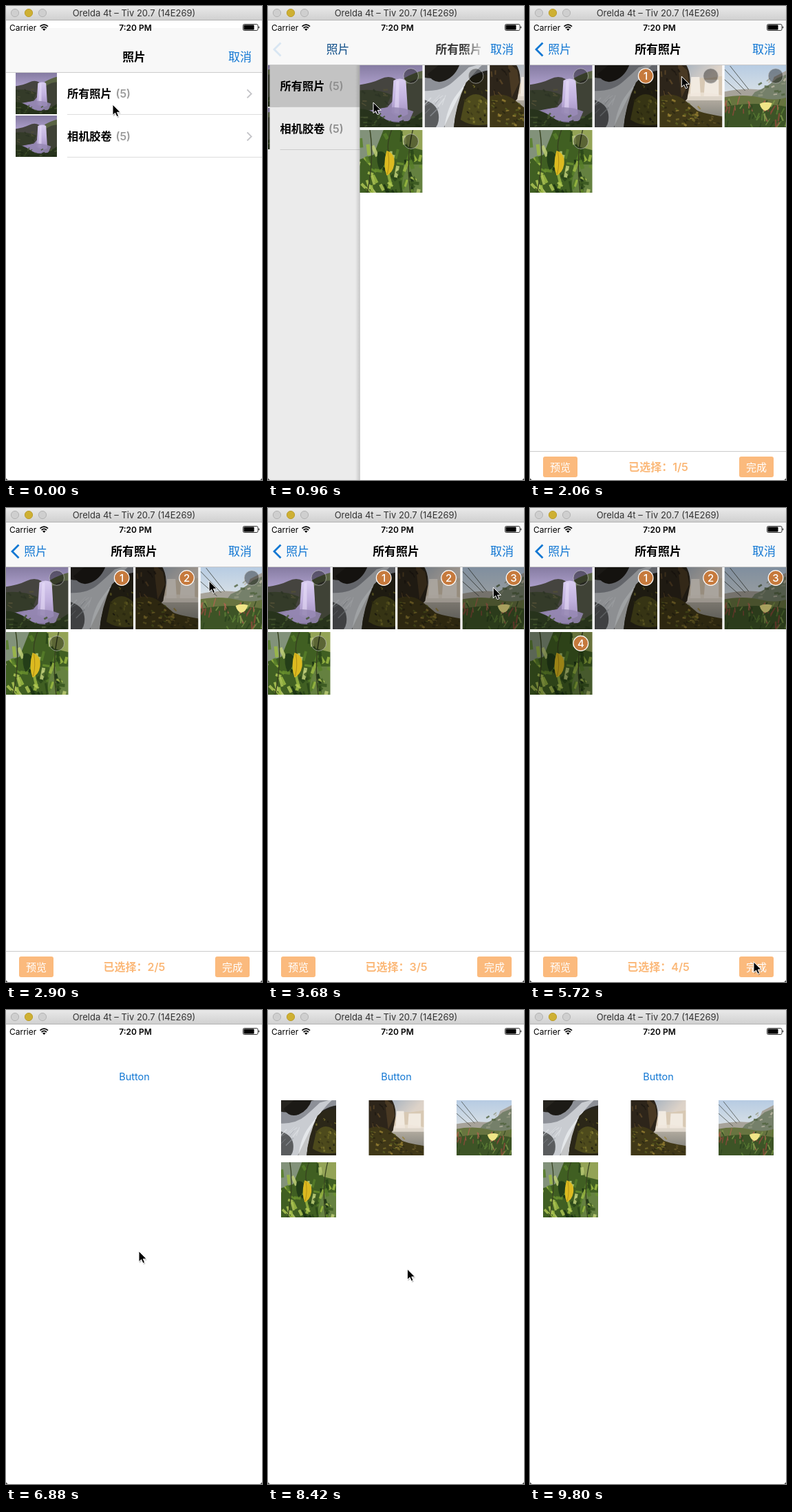
These frames come from a looping animation (372 px wide and 688 px high, 9.82 s). An HTML page:

```html
<!DOCTYPE html>
<html lang="zh-CN">
<head>
<meta charset="utf-8">
<title>Photo picker</title>
<style>
html, body { margin: 0; width: 100%; height: 100%; overflow: hidden; background: #fff; }
svg { display: block; width: 372px; height: 688px; font-family: Inter, "Noto Sans CJK SC", "Noto Sans CJK", sans-serif; }
.mid { text-anchor: middle; }
.bold { font-weight: 600; }
.cjk { font-family: "Noto Sans CJK SC", "Noto Sans CJK", "Noto Sans", sans-serif; }
.blue { fill: #1277d3; }
</style>
</head>
<body>
<svg viewBox="0 0 372 688" xmlns="http://www.w3.org/2000/svg">
  <defs>
    <linearGradient id="chrome" x2="0" y2="1"><stop stop-color="#e9e9e9"/><stop offset="1" stop-color="#d0d0d0"/></linearGradient>
    <linearGradient id="edge"><stop stop-opacity="0"/><stop offset="1" stop-opacity=".16"/></linearGradient>
    <linearGradient id="fade" gradientUnits="userSpaceOnUse" x1="284" x2="316"><stop/><stop offset="1" stop-opacity="0"/></linearGradient>
    <linearGradient id="sky1" x2="0" y2="1"><stop stop-color="#7f769b"/><stop offset=".35" stop-color="#ad9fcb"/><stop offset="1" stop-color="#75688f"/></linearGradient>
    <linearGradient id="fall1" x2="0" y2="1"><stop stop-color="#d9cdf0"/><stop offset=".5" stop-color="#c2b2df"/><stop offset="1" stop-color="#a18fbe"/></linearGradient>
    <linearGradient id="sky3" x2="1" y2="1"><stop stop-color="#7c99b8"/><stop offset=".5" stop-color="#dcd2c8"/><stop offset="1" stop-color="#efe0cc"/></linearGradient>
    <linearGradient id="lake3" x2="0" y2="1"><stop stop-color="#b9b1a5"/><stop offset="1" stop-color="#6c6f6a"/></linearGradient>
    <linearGradient id="sky4" x2="0" y2="1"><stop stop-color="#b3c9e2"/><stop offset=".5" stop-color="#dbe2e6"/></linearGradient>
    <filter id="soft" x="0" y="0" width="1" height="1"><feGaussianBlur stdDeviation=".75"/></filter>
    <clipPath id="screen"><rect y="21" width="372" height="667"/></clipPath>
    <clipPath id="body"><rect y="85" width="372" height="603"/></clipPath>
  </defs>
  <rect width="372" height="688" fill="#fff"/>
  <g clip-path="url(#screen)">
    <text class="mid blue" x="186.5" y="102" font-size="14.4">Button</text>
    <g id="results"></g>
    <g id="modal">
      <rect y="21" width="372" height="667" fill="#fff"/>
      <g clip-path="url(#body)">
        <g id="list"></g>
        <rect id="dim" y="85" width="372" height="603"/>
        <g id="page">
          <rect x="-7" y="85" width="7" height="603" fill="url(#edge)"/>
          <rect y="85" width="372" height="603" fill="#fff"/>
          <g id="grid"></g>
          <g id="bar">
            <rect y="643" width="372" height="46" fill="#fff"/>
            <path d="M0 643.5H372" stroke="#cbcbcb"/>
            <g fill="#fbba7d"><rect x="19" y="651" width="50" height="30" rx="3"/><rect x="304" y="651" width="50" height="30" rx="3"/></g>
            <g class="mid cjk" font-size="15" fill="#fff"><text x="44" y="671.5">预览</text><text x="329" y="671.5">完成</text></g>
            <text id="count" class="mid bold" x="186.5" y="671.5" font-size="16" fill="#fbb878"></text>
          </g>
        </g>
      </g>
      <rect y="21" width="372" height="64" fill="#f8f8f8"/>
      <path d="M0 85.5H372" stroke="#c9c9c9"/>
      <path id="back" d="M18.5 53.5L9 63L18.5 72.5" fill="none" stroke="#1277d3" stroke-width="2.8"/>
      <text id="album" class="mid cjk" y="69.3" font-size="16.8">照片</text>
      <text id="title" class="mid cjk" y="69.3" font-size="16.9" font-weight="600" fill="url(#fade)">所有照片</text>
      <text class="cjk blue" x="323" y="69.3" font-size="17">取消</text>
    </g>
    <text x="5" y="35.5" font-size="12">Carrier</text>
    <g fill="none" stroke="#000" stroke-width="1.7"><path d="M49.5 29.6Q55.3 24.6 61 29.6M51.6 32Q55.3 28.8 59 32"/></g>
    <path d="M55.3 36L53 33.6Q55.3 31.8 57.6 33.6Z"/>
    <text class="mid bold" x="188" y="35.5" font-size="12">7:20 PM</text>
    <rect x="344.5" y="26.5" width="21.5" height="9" rx="1.8" fill="none" stroke="#222" stroke-width=".9"/>
    <rect x="345.5" y="27.5" width="15" height="7" rx=".8"/>
    <path d="M367 29.3Q369.4 31 367 32.7Z"/>
  </g>
  <rect width="372" height="20.5" fill="url(#chrome)"/>
  <path d="M0 20.5H372" stroke="#b4b4b4"/>
  <g fill="#cfcfcf" stroke="#b3b3b3"><circle cx="13" cy="10" r="5.6"/><circle cx="33" cy="10" r="5.6" fill="#ceb033" stroke="#bb9d2b"/><circle cx="53" cy="10" r="5.6"/></g>
  <text class="mid" x="186" y="15" font-size="13" fill="#333">Orelda 4t – Tiv 20.7 (14E269)</text>
  <path d="M0 685V688H3Q.6 687.4 0 685ZM372 685V688H369Q371.4 687.4 372 685Z" fill="#333"/>
  <g id="cursor">
    <path d="M1 2V17.5L4.5 14.2L7 19.5L9.6 18.4L7.3 13.2H12Z" fill="#000" opacity=".22"/>
    <path d="M0 0V15.5L3.6 12.2L6 17.6L8.6 16.5L6.3 11.3H11.2Z" stroke="#fff" stroke-width="1"/>
  </g>
</svg>
<script>
const LOOP = 9820;
const $ = id => document.getElementById(id);
const set = (el, attrs) => { for (const k in attrs) el.setAttribute(k, attrs[k]); };
const clamp = u => Math.max(0, Math.min(1, u));
const smooth = u => (u = clamp(u), u * u * (3 - 2 * u));
const move = (el, x, y) => el.setAttribute('transform', `translate(${x} ${y})`);
// Share of the way still to go, for a critically damped system slide.
const left = ms => { const x = Math.max(0, ms) * .018; return (1 + x) * Math.exp(-x); };

let seed = 7;
const rnd = (a, b) => { seed = (seed * 16807) % 2147483647; return a + (b - a) * seed / 2147483647; };
const shape = (d, fill, op = 1) => `<path d="${d}" fill="${fill}" opacity="${op}"/>`;
const line = (d, color, w, op = 1) => `<path d="${d}" fill="none" stroke="${color}" stroke-width="${w}" opacity="${op}"/>`;
const back = fill => `<rect x="-4" y="-4" width="99" height="99" fill="${fill}"/>`;

// Scattered leaf-like strokes inside a box.
function flecks(n, [x, y, w, h], colors, len, lean, width, op = .8) {
  let out = '';
  for (let i = 0; i < n; i++) {
    const a = lean + rnd(-.6, .6), l = rnd(.5, 1) * len;
    const px = rnd(x, x + w), py = rnd(y, y + h);
    const d = `M${px.toFixed(1)} ${py.toFixed(1)}l${(l * Math.cos(a)).toFixed(1)} ${(l * Math.sin(a)).toFixed(1)}`;
    out += line(d, colors[i % colors.length], (width * rnd(.6, 1.2)).toFixed(1), op);
  }
  return out;
}

const photos = [
  back('url(#sky1)') +
  shape('M-4 30Q18 27 30 21T52 21L54 46L40 62L-4 68Z', '#45443f') +
  shape('M-4 38Q22 34 46 44L38 62L-4 70Z', '#343b29') +
  shape('M66 22Q80 13 95 11V95H60Z', '#3f4236') +
  shape('M64 20Q80 11 95 8V20Q78 20 67 29Z', '#596343') +
  shape('M49 23Q58 18 67 23L70 72Q58 80 46 70Z', 'url(#fall1)') +
  shape('M53 24L57 23L57 72L50 70Z', '#e8def8', .6) +
  shape('M22 68Q48 56 78 68L72 82L28 82Z', '#9688b3', .85) +
  shape('M-4 64Q16 64 32 76T70 82L95 66V95H-4Z', '#27331c') +
  flecks(22, [0, 72, 91, 18], ['#40552a', '#1d2915', '#4a5733'], 7, -.3, 2.4) +
  flecks(10, [2, 36, 36, 22], ['#525036', '#2c3324'], 8, .4, 2.2),

  back('#26241f') +
  shape('M-4 18Q26 26 46 2L72 -4H95V8Q66 12 58 30T38 62L26 95H-4Z', '#8d9097') +
  shape('M-4 38Q24 40 40 26T64 4L86 -2Q66 16 54 38T26 95H2Q14 68 -4 62Z', '#c9ccd1') +
  shape('M28 95Q32 62 46 44T66 18L58 40Q44 62 42 95Z', '#eceef0', .8) +
  shape('M-4 50Q18 56 20 72T12 95H-4Z', '#5a5c5e') +
  shape('M26 -4H52Q46 16 30 23T4 14Z', '#1c1a16') +
  shape('M60 26Q74 10 95 16V95H42Q44 60 60 26Z', '#2b2718') +
  shape('M58 52Q70 38 84 46T95 70V86Q70 92 52 80Z', '#4d4a1c') +
  flecks(30, [54, 26, 36, 58], ['#6e6926', '#3a3616', '#1d1a10', '#827a30'], 5, 1, 2.6) +
  flecks(9, [4, 40, 30, 38], ['#e3e6e9', '#9da2a8'], 18, 2.1, 1.5, .6),

  back('url(#sky3)') +
  shape('M38 34Q52 16 68 20L95 16V52H36Z', '#d8c9b4') +
  shape('M46 18H58L60 52H44ZM66 22H86V50H64Z', '#f4eee5', .9) +
  shape('M34 46H95V95H40Z', 'url(#lake3)') +
  shape('M36 44Q64 36 95 46V52H36Z', '#efe7dc', .7) +
  shape('M-4 -4H36Q46 10 44 28L40 50L28 62H-4Z', '#2d251a') +
  shape('M26 -4L40 8L43 26L32 48Z', '#493923') +
  shape('M-4 48Q18 38 34 50T54 66T95 76V95H-4Z', '#403817') +
  flecks(42, [0, 50, 58, 38], ['#766928', '#9a8235', '#292611', '#5a5f21'], 6, .3, 2.6) +
  flecks(16, [50, 74, 40, 15], ['#6b5d2d', '#2e2917'], 5, .2, 2.2) +
  flecks(10, [2, 6, 30, 34], ['#5e4828', '#1d1811'], 9, 1.2, 2),

  back('url(#sky4)') +
  shape('M-4 40Q26 34 46 36T72 18L95 6V95H-4Z', '#a7a39a') +
  shape('M44 40Q64 32 76 20L95 12V58H30Z', '#75806a') +
  shape('M-4 48Q28 42 52 48T95 46V95H-4Z', '#687440') +
  flecks(14, [36, 24, 54, 22], ['#51633f', '#949781', '#c1b9a7'], 7, -.4, 2.6) +
  shape('M-4 62Q42 52 95 62V95H-4Z', '#3d5426') +
  flecks(54, [0, 58, 91, 36], ['#8d4a3b', '#5c7f36', '#2b421e', '#b06450', '#7f9b4b'], 13, -1.5, 2.1) +
  line('M0 7L30 38M8 2L35 36M-2 20L24 43', '#3c4039', .8) +
  shape('M51 57Q58 53 69 56Q66 66 59 67Q53 65 51 57Z', '#f0e587'),

  back('#405f22') +
  shape('M-4 -4H36L20 36L-4 44Z', '#82927a') +
  shape('M58 -4H95V30L70 24Z', '#93a356') +
  shape('M64 50H95V95H60Z', '#6e8a48', .8) +
  flecks(46, [0, 0, 91, 88], ['#9cba43', '#294518', '#577e29', '#c0cf78', '#182f12'], 17, 1.4, 4.6, .85) +
  flecks(22, [0, 48, 91, 40], ['#b4cb58', '#34531c', '#6a912e'], 14, .7, 4) +
  line('M14 -4Q22 40 10 95M48 -4Q38 18 42 34M78 -4Q66 40 74 95', '#36411f', 1.4) +
  shape('M26 32Q35 28 38 39Q38 52 29 58Q23 46 26 32Z', '#243e18') +
  shape('M39 30Q52 34 50 50Q48 62 39 66Q33 50 39 30Z', '#dcba20') +
  line('M41 32Q44 48 40 64', '#b08d17', 1)
];
document.querySelector('defs').insertAdjacentHTML('beforeend', photos.map((p, i) =>
  `<symbol id="p${i}" viewBox="0 0 91 91"><g filter="url(#soft)">${p}</g></symbol>`).join(''));
const photo = (i, x, y, s) => `<use href="#p${i}" x="${x}" y="${y}" width="${s}" height="${s}"/>`;

$('list').innerHTML = '<rect id="row" y="85" width="372" height="62" fill="#d4d4d4"/>' +
  ['所有照片', '相机胶卷'].map((name, i) => {
    const y = 86 + 62 * i;
    return photo(0, 14, y, 60) +
      `<text class="cjk" x="89" y="${y + 36}" font-size="16.2" font-weight="600">${name}</text>
      <text class="bold" x="159.5" y="${y + 36}" font-size="15.8" fill="#9b9b9b">(5)</text>
      <path d="M350.5 ${y + 24.5}l6 6l-6 6" fill="none" stroke="#c4c4c8" stroke-width="1.9"/>
      <path d="M89 ${y + 60.5}H372" stroke="#dcdcdc"/>`;
  }).join('');

const STEP = 94.4;
$('grid').innerHTML = photos.map((_, i) => {
  const x = i % 4 * STEP, y = i < 4 ? 85 : 180;
  return photo(i, x - .5, y, 91) +
    `<rect id="veil${i}" x="${x - .5}" y="${y}" width="91" height="91"/>
    <g transform="translate(${x + 73.8} ${y + 16.5})">
      <circle id="off${i}" r="10.8" fill="#000" fill-opacity=".38" stroke="#d0d0d0" stroke-opacity=".6"/>
      <g id="on${i}"><circle r="10.8" fill="#c67a3d" stroke="#fff" stroke-width="1.2"/>
      <text class="mid" y="5.4" font-size="15" font-weight="500" fill="#fff">${i}</text></g>
    </g>`;
}).join('');
$('results').innerHTML = [1, 2, 3, 4].map((n, i) =>
  photo(n, 19 + i % 3 * 127.5, i < 3 ? 131 : 221, 80)).join('');

const PRESENT = -336, TAP = 760, PUSH = 840, BAR = 1808, DISMISS = 6330, RESULT = 7040;
const picks = [Infinity, 1790, 2480, 3350, 4720];
const path = [
  [0, 155, 143], [250, 155, 143], [700, 153, 140], [1200, 153, 140], [1620, 166, 101], [1800, 166, 101],
  [2280, 262, 103], [2700, 261, 105], [3200, 357, 108], [3500, 357, 106], [4400, 74, 193], [4850, 74, 193],
  [5800, 330, 668], [6350, 330, 668], [6800, 193, 350], [8000, 193, 350], [8600, 205, 383],
  [9050, 225, 305], [9480, 265, -30], [LOOP, 265, -30]
];

function cursorAt(t) {
  const i = path.findIndex(k => k[0] > t), a = path[i - 1], b = path[i];
  const u = smooth((t - a[0]) / (b[0] - a[0]));
  return [a[1] + (b[1] - a[1]) * u, a[2] + (b[2] - a[2]) * u];
}

function draw(t) {
  const drop = t < DISMISS ? left(t - PRESENT) : 1 - left(t - DISMISS);
  $('modal').style.display = drop > .998 ? 'none' : '';
  move($('modal'), 0, 667 * drop);
  $('results').style.display = t < RESULT ? 'none' : '';

  const rest = left(t - PUSH), p = 1 - rest;
  $('list').style.display = p > .9995 ? 'none' : '';
  $('page').style.display = p > 0 ? '' : 'none';
  move($('list'), -111.6 * p, 0);
  move($('page'), 372 * rest, 0);
  set($('dim'), { opacity: .125 * p });
  set($('row'), { opacity: t < TAP ? 0 : 1 });
  set($('back'), { opacity: clamp((p - .58) / .42) });
  set($('album'), {
    x: 186 - 143 * p ** 1.18,
    fill: `rgb(${18 * p},${119 * p},${211 * p})`,
    'font-weight': p > .3 ? 400 : 600
  });
  set($('title'), { x: 186 + 253 * rest, opacity: clamp(p * 1.2) });

  let count = 0;
  picks.forEach((at, i) => {
    const dt = t - at, on = dt >= 0;
    if (on) count++;
    set($('veil' + i), { opacity: on ? .3 * clamp(dt / 150) : 0 });
    set($('off' + i), { opacity: on ? 0 : 1 });
    const pop = on ? 1 + .2 * Math.exp(-dt / 90) * Math.sin(dt / 45) : 0;
    set($('on' + i), { opacity: on ? 1 : 0, transform: `scale(${pop})` });
  });
  move($('bar'), 0, 46 * (1 - smooth((t - BAR) / 300)));
  $('count').textContent = `已选择：${count}/5`;
  move($('cursor'), ...cursorAt(t));
}

const start = performance.now();
function tick() {
  draw((performance.now() - start) % LOOP);
  requestAnimationFrame(tick);
}
tick();
</script>
</body>
</html>
```
